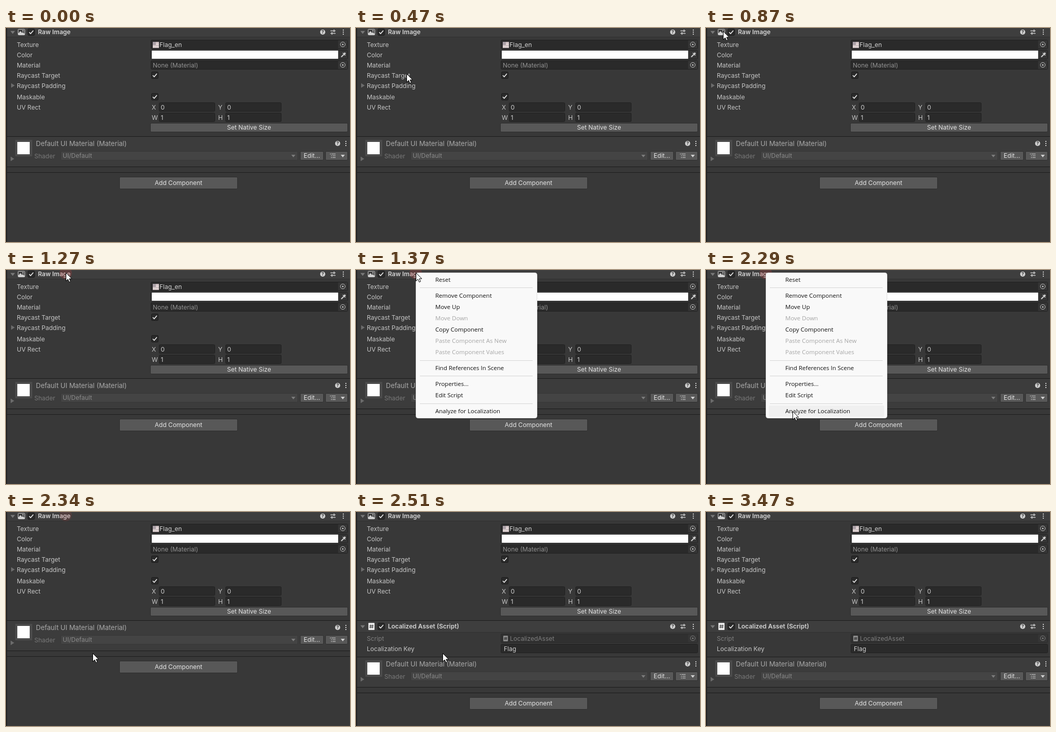
Write an HTML page that moves like this. It is 668 px wide and 417 px high and loops after 4.08 s.

```html
<!DOCTYPE html>
<html lang="en">
<head>
<meta charset="utf-8">
<title>Inspector</title>
<style>
  html, body { margin: 0; width: 100%; height: 100%; overflow: hidden; background: #383838; }
  svg { display: block; width: 668px; height: 417px; font: 12px Inter, Roboto, sans-serif; }
  text { white-space: pre; }
  .menu text { font: 11.5px "Open Sans", "Noto Sans", sans-serif; }
</style>
</head>
<body>
<svg id="stage" viewBox="0 0 668 417" xmlns="http://www.w3.org/2000/svg"></svg>
<script>
const LOOP = 4080, SHIFT = 71;
const MENU_OPEN = 1370, MENU_CLOSE = 2340, ADDED = 2510;
const INK = '#c6c6c6', DIM = '#7f7f7f';

// Drawing helpers; text and icons are placed by their vertical centre.
const rect = (x, y, w, h, fill, extra = '') =>
  `<rect x="${x}" y="${y}" width="${w}" height="${h}" fill="${fill}" ${extra}/>`;
const box = (x, y, w, h, fill, line, r = 2) =>
  rect(x + .5, y + .5, w - 1, h - 1, fill, `stroke="${line}" rx="${r}"`);
const path = (d, fill, extra = '') => `<path d="${d}" fill="${fill}" ${extra}/>`;
const line = (d, color, width = 1) =>
  path(d, 'none', `stroke="${color}" stroke-width="${width}"`);
const text = (x, y, s, fill = INK, extra = '') =>
  `<text x="${x}" y="${y + 4}" fill="${fill}" ${extra}>${s}</text>`;
const label = (x, y, s, fill, extra) => text(x, y + 1, s, fill, extra);
const rule = y => rect(2, y, 666, 1, '#1c1c1c');

const field = (x, y, w) => box(x, y - 9, w, 18, '#2a2a2a', '#212121');
const button = (x, y, w, h, s) =>
  box(x, y - h / 2, w, h, '#585858', '#2e2e2e') +
  text(x + w / 2, y, s, '#e4e4e4', 'text-anchor="middle"');
const check = (x, y) => box(x - 7, y - 7, 14, 14, '#2a2a2a', '#1b1b1b') +
  line(`M${x - 4} ${y + .2}l2.8 2.9 5.2-6.2`, '#efefef', 1.6);
const down = (x, y, color = '#777', s = 4.5) =>
  path(`M${x - s} ${y - s / 2}h${2 * s}l${-s} ${s * 1.25}z`, color);
const right = (x, y) => path(`M${x - 3} ${y - 4.5}l7 4.5-7 4.5z`, '#6c6c6c');
const dots = (x, y) => [-4, 0, 4].map(d => rect(x - 1, y + d - 1, 2, 2, '#d0d0d0')).join('');
const help = (x, y) => `<circle cx="${x}" cy="${y}" r="5" fill="#d0d0d0"/>` +
  `<text x="${x}" y="${y + 3.3}" font-size="9" font-weight="700" fill="#3a3a3a" text-anchor="middle">?</text>`;
const sliders = (x, y) =>
  line(`M${x - 5} ${y - 2.5}h10M${x - 5} ${y + 2.5}h10`, '#c8c8c8', 1.3) +
  line(`M${x + 2} ${y - 5}v5M${x - 2} ${y}v5`, '#c8c8c8', 1.6);
const picker = (y, color = '#c4c4c4') => rect(645, y - 8, 18, 16, '#353535') +
  `<circle cx="654" cy="${y}" r="4.7" fill="none" stroke="${color}"/>` +
  `<circle cx="654" cy="${y}" r="1.6" fill="${color}"/>`;
const hash = (x, y, w, h, fill) => rect(x, y, w, h, fill, 'rx="1"') +
  line(`M${x + w * .4} ${y + h * .25}l-1 ${h * .5}M${x + w * .7} ${y + h * .25}l-1 ${h * .5}` +
       `M${x + w * .18} ${y + h * .4}h${w * .66}M${x + w * .16} ${y + h * .6}h${w * .66}`, '#333');
const header = (y, title) =>
  down(13, y) + check(49, y) +
  text(62, y, title, '#d4d4d4', 'font-weight="600"') +
  help(615, y) + sliders(635, y) + dots(655, y);

const imageIcon = box(23, 2, 14, 12, '#3e3e3e', '#d0d0d0', 1) +
  path('M24 13V10.5l4-4.5 3 3.5 2-1.5 3 3.5V13z', '#d0d0d0') +
  '<circle cx="33" cy="5.5" r="1.3" fill="#d0d0d0"/>';

const dropper = line('M651 56.5l5-5', '#cfcfcf', 2.2) +
  line('M654 48.5l5 5', '#cfcfcf', 1.5) + line('M656 51.5l3-3', '#cfcfcf', 3.2);

const thumb = rect(285, 27, 12, 12, '#cdbfc1') + rect(285, 27, 6, 6, '#aaa0a6') +
  rect(291, 30, 6, 3, '#e3d6d6') + rect(285, 35, 12, 2, '#e2d8d6');

function rawImage() {
  const labels = [['Texture', 32], ['Color', 52], ['Material', 72], ['Raycast Target', 92],
    ['Raycast Padding', 112], ['Maskable', 134], ['UV Rect', 154]];
  const coords = [['X', 283, 154, 0], ['Y', 412, 154, 0], ['W', 283, 174, 1], ['H', 412, 174, 1]];
  return rect(2, 0, 666, 17, '#3e3e3e') + rect(2, 17, 666, 1, '#303030') +
    header(8, 'Raw Image') + imageIcon +
    labels.map(([s, y]) => label(21, y, s)).join('') + right(13, 112) +
    field(281, 32, 383) + picker(32) + thumb + label(298, 32, 'Flag_en', '#d0d0d0') +
    field(281, 52, 383) + rect(283, 44, 362, 16, '#fff') + rect(645, 44, 18, 16, '#353535') + dropper +
    field(281, 72, 383) + picker(72) + label(285, 72, 'None (Material)', '#929292') +
    check(289, 92) + check(289, 134) +
    coords.map(([s, x, y, v]) => label(x, y, s) + field(x + 14, y, 109) +
      label(x + 17.5, y, v, '#d0d0d0')).join('') +
    button(280, 194, 384, 18, 'Set Native Size') + rule(211);
}

function localizedAsset() {
  return rect(2, 212, 666, 22, '#3e3e3e') + rect(2, 234, 666, 1, '#303030') +
    header(223, 'Localized Asset (Script)') + hash(24, 216, 12, 14, '#e8e8e8') +
    label(21, 246, 'Script', DIM) + box(281, 237, 383, 18, '#303030', '#2a2a2a') +
    picker(246, '#7d7d7d') + hash(286, 241, 9, 11, '#8b8b8b') +
    label(299, 246, 'LocalizedAsset', DIM) +
    label(21, 266, 'Localization Key') + field(281, 266, 383) + label(287, 266, 'Flag', '#d0d0d0');
}

function material() {
  return rule(211) + rect(2, 212, 666, 58, '#3c3c3c') +
    rect(18, 218, 33, 32, '#4b4b4b') + rect(22, 222, 24, 24, '#fff') +
    label(58, 225, 'Default UI Material (Material)', '#a9a9a9', 'font-size="13"') +
    help(644, 225) + dots(660, 225) + right(12, 255) +
    label(55, 249, 'Shader', '#787878') +
    box(106, 240, 461, 18, '#444', '#383838') + text(110, 249, 'UI/Default', '#8a8a8a') +
    down(558, 249, '#7c7c7c', 4) +
    button(571, 249, 46, 18, 'Edit...') + button(620, 249, 44, 18, '') +
    line('M629 245.5h2M632 245.5h8M631 249h2M634 249h6M631 252.5h2M634 252.5h6', '#cfcfcf', 1.2) +
    down(654, 249, '#d0d0d0', 4) +
    rule(270) + rule(281) + button(220, 302, 230, 24, 'Add Component');
}

// Label, centre, enabled
const ITEMS = [['Reset', 19, 1], ['Remove Component', 50, 1], ['Move Up', 72, 1],
  ['Move Down', 94, 0], ['Copy Component', 116, 1], ['Paste Component As New', 138, 0],
  ['Paste Component Values', 160, 0], ['Find References In Scene', 191, 1],
  ['Properties...', 222, 1], ['Edit Script', 244, 1], ['Analyze for Localization', 275, 1]];

function menu() {
  return box(116, 5, 236, 284, '#f9f9f9', '#dedede', 4) +
    rect(122, -11, 224, 22, '#f0f0f0', 'id="hover" rx="3"') +
    [34, 176, 206, 260].map(y => rect(124, y, 219, 1, '#d5d5d5')).join('') +
    ITEMS.map(([s, y, on]) => text(154, y, s, on ? '#111' : '#a5a5a5')).join('');
}

const stage = document.getElementById('stage');
stage.innerHTML = rect(0, 0, 668, 417, '#383838') + rect(0, 0, 2, 417, '#1e1e1e') +
  rawImage() +
  `<g id="asset">${localizedAsset()}</g><g id="lower">${material()}</g>` +
  '<circle id="click" cx="116" cy="6" r="12" fill="#d23c3c"/>' +
  `<g id="menu" class="menu">${menu()}</g>` +
  '<g id="cursor">' +
  path('M.5 .5V16.5L4.2 13 6.8 18.6 9.4 17.4 6.9 12H11.8z', '#fff', 'stroke="#000" stroke-width="1"') +
  '</g>';

const $ = id => document.getElementById(id);
const show = (id, on) => $(id).setAttribute('visibility', on ? 'visible' : 'hidden');
const move = (id, x, y) => $(id).setAttribute('transform', `translate(${x} ${y})`);

const easeOut = k => s => 1 - (1 - s) ** k;
const easeIn = s => s ** 1.5;
const smooth = s => s * s * (3 - 2 * s);

// Pointer strokes advance in discrete steps; "lead" counts the first visible step.
const STROKES = [
  { t: 150, steps: 14, gap: 51.4, lead: 0, from: [247, 380], to: [33, 6], ex: easeOut(2.12), ey: easeOut(2.68) },
  { t: 1020, steps: 4, gap: 50, lead: 1, from: [33, 6], to: [116, 5], ex: smooth, ey: smooth },
  { t: 1540, steps: 14, gap: 50, lead: 1, from: [116, 5], to: [168, 275], ex: easeOut(1.95), ey: easeOut(2.41) },
  { t: 3220, steps: 6, gap: 50, lead: 1, from: [168, 275], to: [430, 440], ex: easeIn, ey: easeIn }
];

function pointer(t) {
  const k = STROKES.filter(s => s.t <= t).pop();
  if (!k) return null;
  const s = Math.min(1, (Math.floor((t - k.t) / k.gap) + k.lead) / k.steps);
  const mix = (i, ease) => Math.round(k.from[i] + (k.to[i] - k.from[i]) * ease(s));
  return [mix(0, k.ex), mix(1, k.ey)];
}

function draw(t) {
  const p = pointer(t);
  show('cursor', p);
  if (p) move('cursor', ...p);

  const added = t >= ADDED;
  show('asset', added);
  move('lower', 0, added ? SHIFT : 0);

  show('click', t >= 1220 && t < ADDED);
  $('click').setAttribute('opacity', t < MENU_CLOSE ? .22 : .13);

  const open = t >= MENU_OPEN && t < MENU_CLOSE;
  show('menu', open);
  const item = open && ITEMS.find(([, y]) => Math.abs(p[1] - y) <= 11);
  show('hover', item);
  if (item) move('hover', 0, item[1]);
}

const start = performance.now();
function tick() {
  draw((performance.now() - start) % LOOP);
  requestAnimationFrame(tick);
}
tick();
</script>
</body>
</html>
```
